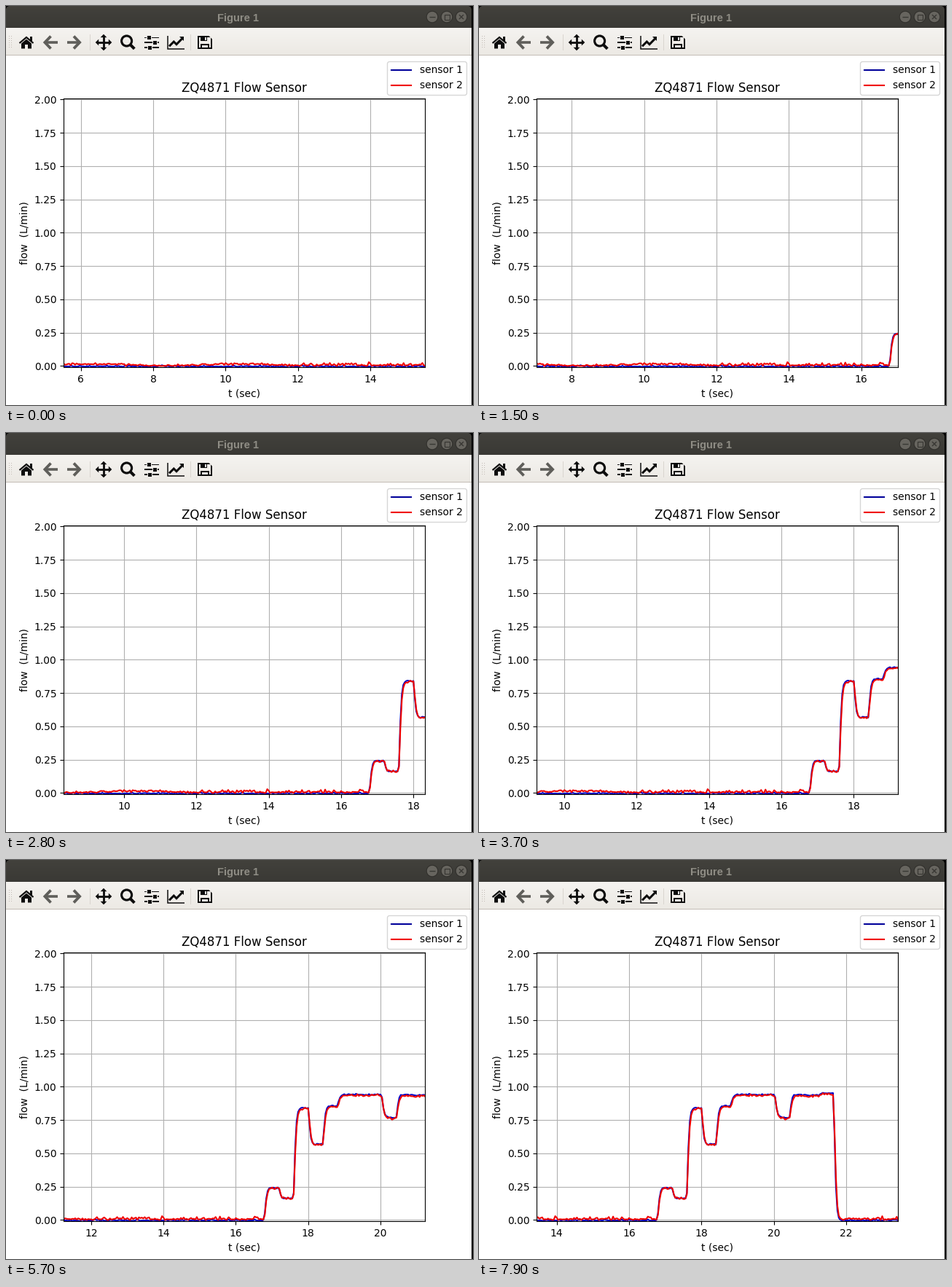
A matplotlib script that plays this animation: 641x548 px, repeating every 8 s.

```python
import matplotlib.pyplot as plt
import numpy as np
from matplotlib.animation import FuncAnimation
from matplotlib.colors import LinearSegmentedColormap
from matplotlib.patches import Circle, Polygon, Rectangle
from matplotlib.ticker import MultipleLocator

W, H, DPI = 641, 548, 100
FRAMES, STEP_MS = 80, 100
PT = 72 / DPI  # points per pixel
INK, DIM, BAR = "#0c0c0c", "#5f5e5a", "#f1eeea"
BLUE, RED = "#0000c8", "#f00000"

fig = plt.figure(figsize=(W / DPI, H / DPI), dpi=DPI, facecolor="white")

# ---- window chrome, drawn in pixel coordinates ----
win = fig.add_axes([0, 0, 1, 1], zorder=-1)
win.axis("off")


def gradient(y0, y1, top, bottom):
    cmap = LinearSegmentedColormap.from_list("g", [top, bottom])
    win.imshow(np.linspace(0, 1, 64)[:, None], cmap=cmap, aspect="auto",
               extent=(0, 639, y1, y0), interpolation="bilinear")


def stroke(points, width, color=INK):
    xs, ys = zip(*points)
    win.plot(xs, ys, color=color, lw=width * PT, solid_capstyle="butt",
             solid_joinstyle="miter", zorder=4)


def fill(points, color=INK):
    win.add_patch(Polygon(points, fc=color, ec="none", zorder=3))


def box(x, y, w, h, color=INK):
    win.add_patch(Rectangle((x, y), w, h, fc=color, ec="none", zorder=3))


def ring(x, y, r, width, edge=INK, face="none"):
    win.add_patch(Circle((x, y), r, fc=face, ec=edge, lw=width * PT,
                         zorder=3))


def title_bar():
    gradient(0, 30, "#42413c", "#3a3935")
    for x, s in ((0, 1), (639, -1)):
        fill([(x, 0), (x + 4 * s, 0), (x + 1.3 * s, 1.3), (x, 4)], "black")
    win.text(318.5, 15.5, "Figure 1", color="#8f8d85", size=10.5,
             family="Liberation Sans", weight="bold",
             ha="center", va="center_baseline")
    dark = "#393834"
    for x in (585, 605, 625):
        ring(x, 15, 7.8, 1, "#2f2e2a", "#67655f")
    stroke([(581, 15), (589, 15)], 1.4, dark)
    win.add_patch(Rectangle((601.5, 11.5), 7, 7, fc="none", ec=dark,
                            lw=1.3 * PT, zorder=4))
    for s in (-1, 1):
        stroke([(622, 15 - 3 * s), (628, 15 + 3 * s)], 1.4, dark)


def home(x, y):
    stroke([(x - 9.5, y + 1), (x, y - 7), (x + 9.5, y + 1)], 2.2)
    box(x + 5, y - 8, 2.8, 6)
    fill([(x - 7, y + 8.5), (x - 7, y + 1.5), (x, y - 4.4),
          (x + 7, y + 1.5), (x + 7, y + 8.5)])
    box(x - 2, y + 3, 4, 6, BAR)


def arrow(tip, y, s):
    stroke([(tip + 2 * s, y), (tip + 20 * s, y)], 3.6, DIM)
    stroke([(tip + 10.5 * s, y - 8.5), (tip + 2.4 * s, y),
            (tip + 10.5 * s, y + 8.5)], 3.8, DIM)


def move(x, y):
    for dx, dy in ((1, 0), (-1, 0), (0, 1), (0, -1)):
        stroke([(x, y), (x + 9 * dx, y + 9 * dy)], 2.8)
        bx, by = x + 6.8 * dx, y + 6.8 * dy
        fill([(x + 11.3 * dx, y + 11.3 * dy),
              (bx + 4.4 * dy, by + 4.4 * dx),
              (bx - 4.4 * dy, by - 4.4 * dx)])


def zoom(x, y):
    ring(x - 1.4, y - 2, 7, 3.1)
    stroke([(x + 3.5, y + 3), (x + 9.3, y + 8.8)], 4)


def sliders(x, y):
    for row, knob in ((-1, -4), (0, 4), (1, -2.5)):
        cy = y + 0.3 + 6.8 * row
        box(x - 10, cy - 0.9, 20, 1.8)
        box(x + knob - 3.5, cy - 3, 7, 6, BAR)
        box(x + knob - 2.5, cy - 2.5, 5, 5)


def chart(x, y):
    stroke([(x - 11.3, y - 9), (x - 11.3, y + 8.7), (x + 12, y + 8.7)], 1.5)
    stroke([(x - 9, y + 5.3), (x - 2.7, y - 1), (x + 1, y + 2.7),
            (x + 8.5, y - 5)], 3)
    fill([(x + 4.8, y - 8), (x + 11.2, y - 8), (x + 11.2, y - 1.6)])


def save(x, y):
    fill([(x - 10, y - 9), (x + 5.5, y - 9), (x + 10, y - 4.5),
          (x + 10, y + 9), (x - 10, y + 9)])
    box(x - 8, y - 7, 16, 14, BAR)
    box(x - 6, y - 8, 9, 6)
    box(x - 0.5, y - 7, 2.3, 4, BAR)
    box(x - 6, y + 2, 12, 6)
    box(x - 4.4, y + 3.6, 8.8, 3.5, BAR)


def tool_bar(y=50):
    gradient(30, 68, "#f5f3f0", "#ece9e4")
    box(0, 67, 639, 1, "#c3bdb5")
    for gy in range(41, 59, 3):
        for gx in (4, 7):
            box(gx, gy, 1, 1, "#c2bdb6")
    for x in (115, 253):
        box(x, 39, 1, 22, "#d9d5cf")
    home(28, y)
    arrow(51, y, 1)
    arrow(103.5, y, -1)
    for icon, x in ((move, 134), (zoom, 167), (sliders, 200),
                    (chart, 233), (save, 273)):
        icon(x, y)


title_bar()
tool_bar()
box(639, 0, 2, H, "black")
win.set(xlim=(0, W), ylim=(H, 0))

# ---- sensor data: the valve moves to the next level every PERIOD ----
START, PERIOD, RISE = 16.78, 0.406, 0.055
LEVELS = [0.24, 0.16, 0.84, 0.567, 0.856, 0.941, 0.941, 0.941,
          0.77, 0.941, 0.935, 0.952, 0]
rng = np.random.default_rng(12)
t = np.arange(5, 24, 0.04)


def flow(rise):
    y = np.zeros_like(t)
    for k, change in enumerate(np.diff(LEVELS, prepend=0)):
        u = np.maximum(t - START - k * PERIOD, 0) / rise
        y += change * (1 - np.exp(-u ** 1.4))
    return y


def noise(sigma):
    return rng.normal(0, sigma, t.size)


flow1, flow2 = flow(RISE), flow(1.15 * RISE)
idle = flow2 < 0.02
drift = np.where(t < 11.5, 0.009 + 0.007 * np.cos(np.pi * (t - 6.3) / 2),
                 0.006)
spikes = np.where((rng.random(t.size) > 0.87) & (t > 11.5), 0.013, 0)
y1 = flow1 + np.where(idle, noise(0.003) - 0.003, noise(0.003))
y2 = flow2 + np.where(idle, np.maximum(drift + noise(0.004), 0) + spikes,
                      noise(0.0045) - 0.008 * flow2)

# ---- plot: a default 640 x 480 canvas placed inside the window ----
CX, CY, CW, CH = -1, 69, 640, 480
ax = fig.add_axes([(CX + 0.125 * CW) / W, 1 - (CY + 0.89 * CH) / H,
                   0.775 * CW / W, 0.77 * CH / H])
ax.plot(t, y1, color=BLUE, label="sensor 1")
ax.plot(t, y2, color=RED, label="sensor 2")
ax.set_title("ZQ4871 Flow Sensor")
ax.set_xlabel("t (sec)")
ax.set_ylabel("flow  (L/min)")
ax.set_ylim(-0.01, 2.01)
ax.yaxis.set_major_locator(MultipleLocator(0.25))
ax.xaxis.set_major_locator(MultipleLocator(2))
ax.grid(True)
legend = fig.legend(loc="upper right",
                    bbox_to_anchor=((CX + CW) / W, 1 - CY / H))
legend.get_lines()[0].set_color("#00009a")

LEFT, SPEED, SPAN = 5.52, 1.003, 9.99


def update(i):
    left = LEFT + SPEED * i * STEP_MS / 1000
    ax.set_xlim(left, left + SPAN)


anim = FuncAnimation(fig, update, frames=FRAMES, interval=STEP_MS,
                     repeat=True, repeat_delay=0, blit=False)
plt.show()
```
